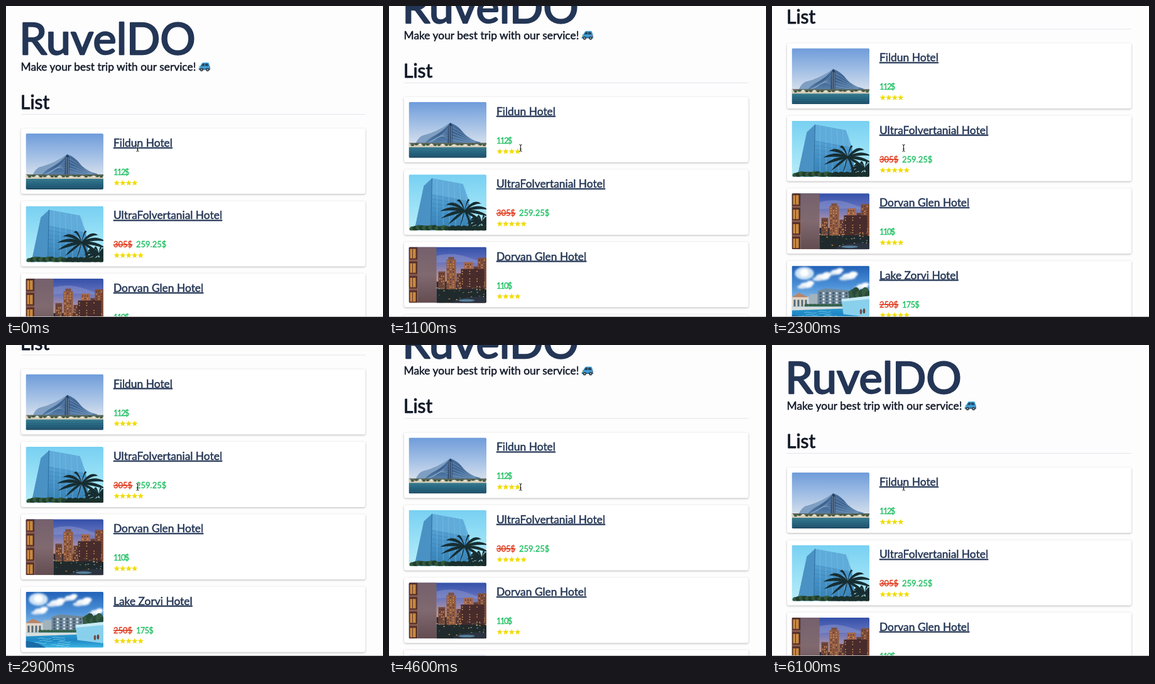
An HTML page that plays this animation: 600x495 px, repeating every 6.2 s.

```html
<!DOCTYPE html>
<html lang="en">
<head>
<meta charset="utf-8">
<title>Hotel list</title>
<style>
  html, body { margin: 0; width: 100%; height: 100%; overflow: hidden; background: #fdfdfe; }
  svg { display: block; width: 100vw; height: 100vh; }
  text {
    font-family: Lato, sans-serif; color: #111827;
    fill: currentColor; stroke: currentColor; stroke-width: .028em; stroke-linejoin: round;
  }
  .brand { font-size: 70.5px; color: #243656; stroke-width: .034em; }
  .tag { font-size: 17.4px; }
  .head { font-size: 30px; }
  .name { font-size: 17.4px; color: #243656; text-decoration: underline; text-decoration-thickness: 1px; }
  .price { font-size: 13px; color: #1cbf60; }
  .old { color: #e03a1c; text-decoration: line-through; text-decoration-thickness: 1px; }
  .card { fill: #fff; filter: drop-shadow(0 1px 1.4px rgba(0, 0, 0, .28)); }
</style>
</head>
<body>
<svg id="stage" viewBox="0 0 600 495" preserveAspectRatio="xMidYMid meet"></svg>
<script>
const LOOP = 6200, STEP = 100;
const stage = document.getElementById('stage');

let seed = 7;
const rand = () => (seed = (seed * 16807) % 2147483647) / 2147483647;
const repeat = (n, fn) => Array.from({ length: n }, (_, i) => fn(i)).join('');
const rect = (x, y, w, h, fill, extra = '') =>
  `<rect x="${x}" y="${y}" width="${w}" height="${h}" fill="${fill}" ${extra}/>`;
const path = (d, fill, extra = '') => `<path d="${d}" fill="${fill}" ${extra}/>`;
const line = (d, color, width, extra = '') =>
  `<path d="${d}" fill="none" stroke="${color}" stroke-width="${width}" ${extra}/>`;
const oval = (x, y, rx, ry, fill, extra = '') =>
  `<ellipse cx="${x}" cy="${y}" rx="${rx}" ry="${ry}" fill="${fill}" ${extra}/>`;
const label = (x, y, cls, str, extra = '') => `<text x="${x}" y="${y}" class="${cls}" ${extra}>${str}</text>`;
const gradient = (id, ...colors) => `<linearGradient id="${id}" x2="0" y2="1">` +
  colors.map((c, i) => `<stop offset="${i / (colors.length - 1)}" stop-color="${c}"/>`).join('') +
  '</linearGradient>';

const defs = `<defs>
  <clipPath id="frame"><rect width="123.5" height="89" rx="2"/></clipPath>
  <filter id="soft"><feGaussianBlur stdDeviation="1.6"/></filter>
  ${gradient('daySky', '#6f9cda', '#a3c0e5', '#dfe5ee')}
  ${gradient('sea', '#35788c', '#22607c', '#1c4a64')}
  ${gradient('sail', '#4a6f9c', '#3b6290', '#5d84ad')}
  ${gradient('cyanSky', '#78d0f2', '#97e0f6', '#b8ecf8')}
  ${gradient('glass', '#62aedb', '#4a96cb', '#3580b4')}
  ${gradient('dusk', '#3450a8', '#5f6fbe', '#a58fa8', '#dc9d70')}
  ${gradient('wall', '#75606c', '#806a70', '#624c50')}
  ${gradient('deepSky', '#2262b8', '#4d92d8', '#a4cdec')}
  ${gradient('pool', '#2f9fd2', '#1e86c4', '#39b4e2')}
</defs>`;

function waveHotel() {
  return rect(0, 0, 124, 72, 'url(#daySky)') +
    path('M11 67Q14 58 21 54Q46 48 66 33Q78 37 87 49Q97 61 114 64V68H11Z', 'url(#sail)') +
    path('M11 67Q14 58 21 54Q46 48 66 33Q56 45 44 52Q28 60 24 68Z', '#7f9fc2') +
    repeat(5, i => line(`M${28 + i * 3} ${66 - i}Q50 ${57 - i * 2} 63 ${42 + i * 4}`, '#8eabca', .6)) +
    repeat(5, i => line(`M69 ${40 + i * 5}Q82 ${47 + i * 4} 106 ${63 + i}`, '#8baccb', .6)) +
    path('M63 38L66 33L69 37V67H62Z', '#243f62') +
    line('M64.5 37V66M67.5 38V66', '#b7cbe0', .7) +
    rect(0, 65, 124, 4, '#59665a') + rect(0, 68, 124, 4, '#d8cdb5') +
    repeat(22, i => oval(i * 6, 67 + rand() * 2, 2.5, 1.5, i % 3 ? '#3f573f' : '#e9e2d4')) +
    rect(0, 72, 124, 17, 'url(#sea)') +
    repeat(5, i => line(`M0 ${74 + i * 3}H124`, '#5b9aa6', .4, 'opacity=".5"'));
}

function palm(x, y, size) {
  return line(`M${x} ${y}Q${x + 9} ${y + 14} ${x + 8} 92`, '#1f2b2b', 3.2) +
    repeat(12, i => {
      const a = i * Math.PI / 6 + .2;
      const ex = x + Math.cos(a) * size, ey = y + Math.sin(a) * size * .55 + 6;
      const mx = x + Math.cos(a) * size * .55, my = y + Math.sin(a) * size * .45 - 7;
      return path(`M${x} ${y}Q${mx} ${my} ${ex} ${ey}Q${mx} ${my + 9} ${x} ${y + 2}Z`, '#172d31');
    });
}

function glassTower() {
  return rect(0, 0, 124, 89, 'url(#cyanSky)') +
    path('M9 89L24 18L37 6L86 15L96 43L101 89Z', 'url(#glass)') +
    path('M9 89L24 18L37 6L35 89Z', '#4a92c4') +
    path('M37 6L86 15L96 43L37 32Z', '#5fabda') +
    repeat(8, i => line(`M36 ${32 + i * 7}L${96 + i * .5} ${43 + i * 6}`, '#3a83b8', .6)) +
    repeat(6, i => line(`M${45 + i * 9} ${8 + i * 1.6}L${45 + i * 10} 89`, '#86c0e0', .5)) +
    line('M37 6L35 89', '#2e6d9e', 1) +
    repeat(12, i => oval(6 + i * 5, 87 - rand() * 3, 5, 4, i % 2 ? '#203d2c' : '#34583a')) +
    palm(89, 57, 40) + palm(116, 75, 24) +
    repeat(7, i => oval(70 + i * 9, 87, 7, 6, '#1a302c'));
}

function duskCity() {
  const tower = (x, y, w, color) => rect(x, y, w, 89 - y, color) +
    repeat(Math.floor((80 - y) / 4) * 3, i =>
      rect(x + 1.5 + (i % 3) * (w - 2) / 3, y + 3 + Math.floor(i / 3) * 4, 1.6, 1.5,
        rand() > .5 ? '#dda05a' : '#432c32'));
  return rect(0, 0, 124, 64, 'url(#dusk)') +
    path('M44 14Q70 7 96 17T124 22V28Q90 22 44 25Z', '#8d96cc', 'opacity=".5"') +
    rect(44, 55, 80, 34, '#2c2930') +
    tower(47, 39, 11, '#75493a') + tower(60, 20, 15, '#925c42') + rect(63, 16, 9, 4, '#7d4f40') +
    tower(76, 42, 8, '#66403a') + tower(88, 24, 14, '#a4674a') + tower(103, 31, 8, '#69423c') +
    tower(110, 17, 14, '#83503c') + tower(83, 35, 37, '#482b2b') +
    rect(44, 67, 80, 22, '#202a2c') +
    repeat(42, () => oval(45 + rand() * 78, 62 + rand() * 24, .6 + rand(), .7,
      ['#ffd98a', '#e69443', '#54754c', '#6592b0'][Math.floor(rand() * 4)])) +
    path('M68 89Q82 77 124 80V89Z', '#2b3340') + oval(92, 85, 13, 2, '#56809c') +
    rect(0, 0, 14, 89, '#55302a') +
    repeat(4, i => rect(2, 3 + i * 23, 9, 15, '#c98a42') + rect(5.5, 3 + i * 23, 1, 15, '#5d342a') +
      rect(1, 20 + i * 23, 13, 3, '#8a5b4e')) +
    rect(14, 0, 30, 89, 'url(#wall)');
}

function poolResort() {
  const cloud = (x, y, s) => oval(x, y, 11 * s, 5 * s, '#f5f9fd') +
    oval(x + 7 * s, y - 4 * s, 7 * s, 4 * s, '#fff') + oval(x - 8 * s, y + 3 * s, 8 * s, 3 * s, '#dfe9f3');
  return rect(0, 0, 124, 65, 'url(#deepSky)') +
    `<g filter="url(#soft)">${oval(20, 12, 15, 10, '#cfe4f6')}${oval(20, 11, 7, 6, '#fff')}` +
    cloud(49, 18, 1) + cloud(71, 10, .8) + cloud(91, 17, 1) + cloud(23, 31, .9) + cloud(112, 33, .8) + '</g>' +
    repeat(7, i => oval(92 + i * 5, 48 - (i % 3) * 3, 6, 8, i % 2 ? '#365c42' : '#294b3a')) +
    rect(28, 45, 15, 20, '#a2b3be') + path('M41 65V40L54 36L90 39L93 65Z', '#71889a') +
    repeat(4, r => repeat(9, i => rect(44 + i * 5.2, 42 + r * 5, 3, 3, i % 2 ? '#d4dfe5' : '#3e586d'))) +
    rect(0, 49, 27, 17, '#ded6ca') + path('M0 50L11 43L27 50Z', '#b98568') +
    repeat(4, i => rect(3 + i * 6, 54, 3, 11, '#516b7b')) +
    repeat(10, i => oval(24 + i * 6, 63, 4, 2.5, '#35614a')) +
    rect(0, 65, 124, 24, 'url(#pool)') + path('M0 65H82V68L0 71Z', '#d8dedd') +
    path('M79 53L124 48V82L82 77Z', '#89d0ec') + path('M79 53L124 48V53L80 57Z', '#c9ebf5') +
    repeat(9, i => line(`M${4 + rand() * 55} ${73 + i * 1.7}q5 -2 10 0t10 0`, '#8cdcf0', .7)) +
    oval(110, 73, 1.8, 4, '#774f45') + oval(115, 72, 1.8, 4, '#664337') +
    path('M0 78Q18 80 32 89H0Z', '#1a6aa6');
}

function star(x, y) {
  const pts = repeat(10, i => {
    const a = i * Math.PI / 5 - Math.PI / 2, r = i % 2 ? 2.2 : 5;
    return `${(x + Math.cos(a) * r).toFixed(2)},${(y + Math.sin(a) * r).toFixed(2)} `;
  });
  return `<polygon points="${pts}" fill="#f0dc0a"/>`;
}

// Prices with a "1" are set tighter.
const price = (x, str, cls = '') =>
  label(x, 74, 'price ' + cls, str, `letter-spacing="${-.8 * (str.split('1').length - 1)}"`);

const hotels = [
  { name: 'Fildun Hotel', now: '112$', stars: 4, photo: waveHotel },
  { name: 'UltraFolvertanial Hotel', old: '305$', now: '259.25$', stars: 5, photo: glassTower },
  { name: 'Dorvan Glen Hotel', now: '110$', stars: 4, photo: duskCity },
  { name: 'Lake Zorvi Hotel', old: '250$', now: '175$', stars: 5, photo: poolResort }
];

const card = (h, i) => `<g transform="translate(24 ${195 + i * 115.4})">
  <rect class="card" width="548" height="104" rx="3"/>
  <g transform="translate(7.5 8)"><g clip-path="url(#frame)">${h.photo()}</g></g>
  ${label(147, 29, 'name', h.name)}
  ${h.old ? price(147, h.old, 'old') : ''}${price(h.old ? 183 : 147, h.now)}
  ${repeat(h.stars, k => star(152.3 + k * 9.5, 86.7))}
</g>`;

const car = `<g transform="translate(306 89)">
  ${path('M1 8.5Q1 7 3 6.5L6 2Q6.7 1 8 1H15Q16.5 1 17 2.3L18.5 7Q19 8 19 12.5H1Z', '#3f9fd6')}
  ${path('M4.6 6.5L7 2.7H10V6.5ZM11 2.7H15L16.6 6.5H11Z', '#27455f')}
  ${rect(.7, 10.5, 18.3, 2, '#2a6d9c')}${rect(.8, 8, 2, 1.6, '#f4d67a')}${rect(17.6, 8, 1.2, 2, '#d94a3a')}
  ${oval(5.2, 12.3, 2.6, 2.6, '#30343b')}${oval(5.2, 12.3, 1.1, 1.1, '#b9c0c8')}
  ${oval(14.8, 12.3, 2.6, 2.6, '#30343b')}${oval(14.8, 12.3, 1.1, 1.1, '#b9c0c8')}
</g>`;

const beam = 'M207.5 220.6Q209.5 220.6 209.5 222.2Q209.5 220.6 211.5 220.6M209.5 222V230' +
  'M207.5 231.4Q209.5 231.4 209.5 229.8Q209.5 231.4 211.5 231.4M208.2 227.6H210.8';

stage.innerHTML = defs + rect(0, 0, 600, 495, '#fdfdfe') + `<g id="page">
  ${label(21, 77, 'brand', 'RuvelDO')}
  ${label(23.5, 103, 'tag', 'Make your best trip with our service!')}${car}
  ${label(23, 164, 'head', 'List')}
  ${rect(24, 172, 548, 1, '#e3e5ea')}
  ${hotels.map(card).join('')}
</g>` + line(beam, '#fff', 2.4, 'opacity=".8"') + line(beam, '#111', 1) + rect(0, 494, 600, 1, '#b4b4b6');

const page = document.getElementById('page');

// Scroll gestures: [time, offset], eased between neighbours.
const keys = [[0, 0], [300, 0], [1200, 52], [1330, 52], [2690, 156.5],
  [3800, 156.5], [4700, 52], [4900, 52], [5700, 0], [LOOP, 0]];

function scrollAt(t) {
  const i = keys.findIndex(k => k[0] > t);
  const [t0, y0] = keys[i - 1], [t1, y1] = keys[i];
  const u = (t - t0) / (t1 - t0);
  return y0 + (y1 - y0) * u * u * (3 - 2 * u);
}

function draw(ms) {
  const t = Math.floor((ms % LOOP) / STEP) * STEP;
  page.setAttribute('transform', `translate(0 ${-scrollAt(t).toFixed(2)})`);
}

const start = performance.now();
function tick() {
  draw(performance.now() - start);
  requestAnimationFrame(tick);
}
tick();
</script>
</body>
</html>
```
